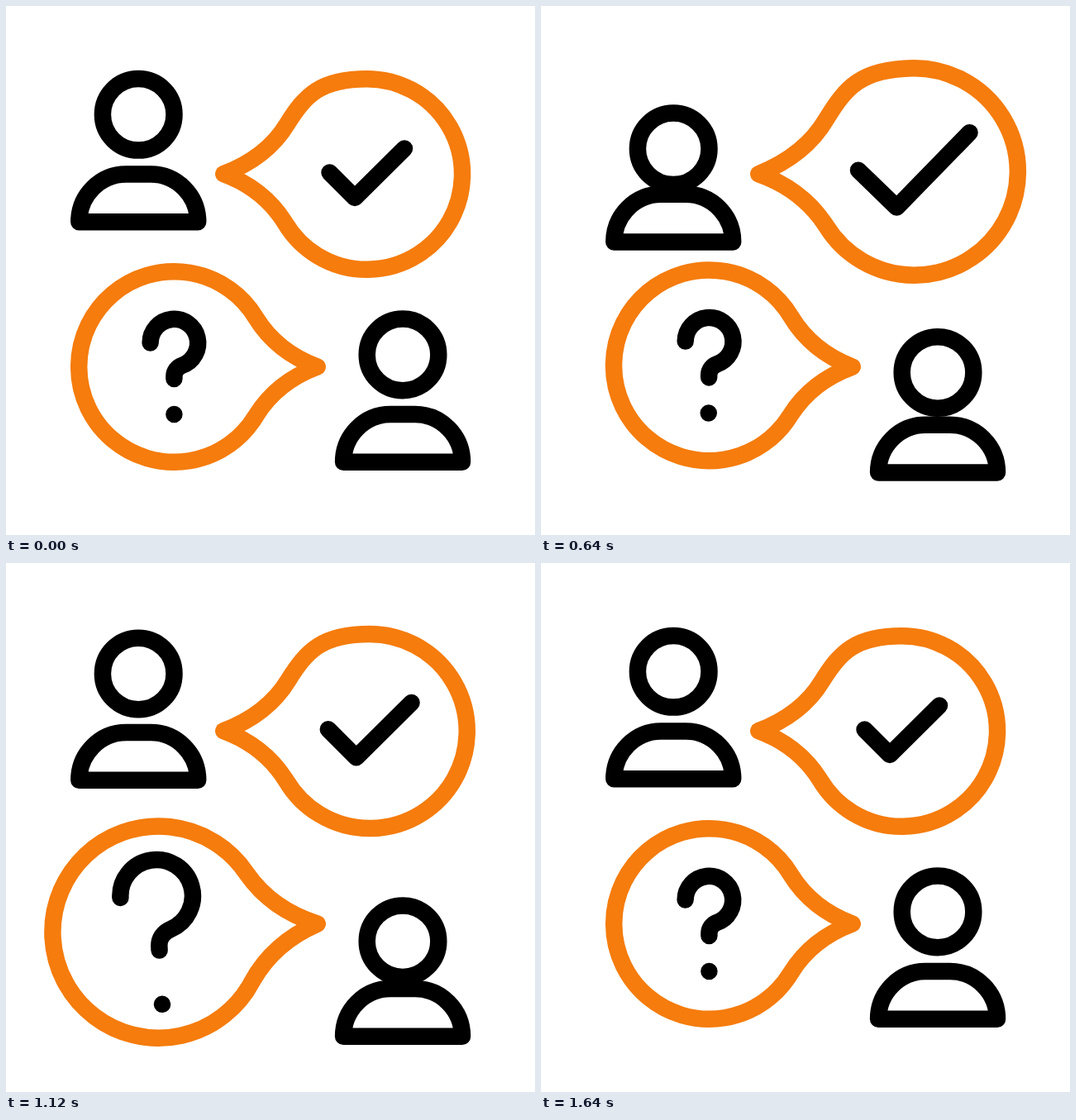
Recreate the animation shown at these times as an HTML page. Size 640x640 px, loop 1720 ms.

```html
<!DOCTYPE html>
<html lang="en">
<head>
<meta charset="utf-8">
<title>Question and answer</title>
<style>
@property --bow { syntax: "<number>"; inherits: true; initial-value: 0; }
@property --swell { syntax: "<number>"; inherits: true; initial-value: 0; }
@property --turn { syntax: "<number>"; inherits: true; initial-value: 0; }

html, body {
  margin: 0;
  width: 100%;
  height: 100%;
  overflow: hidden;
  background: #fff;
}
svg {
  display: block;
  width: 100vw;
  height: 100vh;
  fill: none;
  stroke: #000;
  stroke-width: 20.5px;
  stroke-linecap: round;
  stroke-linejoin: round;
}

.person, .bubble {
  animation: 1720ms cubic-bezier(.37, 0, .63, 1) infinite;
}
.person { animation-name: bow; }
.bubble { animation-name: swell, turn; }
.late { animation-delay: 330ms; }

.head { transform: translateY(calc(41.5px * var(--bow))); }
.body { transform: translateY(calc(24.3px * var(--bow))); }

/* Shapes grow while their line weight stays constant */
.bubble {
  --size: calc(1 + var(--grow) * var(--swell));
  --mark: calc(1 + .52 * var(--swell));
  transform: rotate(calc(var(--side) * var(--turn) * 1deg)) scale(var(--size));
}
.outline {
  stroke: #f57c0d;
  stroke-width: calc(20.5px / var(--size));
}
.mark {
  transform: scale(calc(var(--mark) / var(--size)));
  stroke-width: calc(20.5px / var(--mark));
}
.answer { --grow: .0905; --side: 1; transform-origin: 263.3px 203.2px; }
.answer .mark { transform-origin: 436.7px 203px; }
.question { --grow: .111; --side: -1; transform-origin: 376.7px 436.5px; }
.question .mark { transform-origin: 203.4px 436.5px; }

@keyframes bow {
  0%, 3.78% { --bow: 0; }
  31.7%, 38.1% { --bow: 1; }
  70.5%, 100% { --bow: 0; }
}
@keyframes swell {
  0%, 16.9% { --swell: 0; }
  40.7%, 47.8% { --swell: 1; }
  73%, 100% { --swell: 0; }
}
@keyframes turn {
  0%, 15.7% { --turn: 0; }
  26.7%, 29.1% { --turn: -5; }
  45.3%, 47.7% { --turn: 3; }
  64.5%, 100% { --turn: 0; }
}
</style>
</head>
<body>
<svg viewBox="0 0 640 640">
  <g class="bubble answer">
    <path class="outline" d="M263.3 203.2C290 193 320 176 340 143C362 108 380 88.2 436.7 88.2A115.3 115.3 0 1 1 337.8 262.7C318 231 290 213 263.3 203.2Z"/>
    <path class="mark" d="M391.5 201.5L422 232L482 172.5"/>
  </g>
  <g class="bubble question late">
    <path class="outline" d="M376.7 436.5C350 426.5 322 409 302.4 377.3A115.3 115.3 0 1 0 302.4 495.7C322 464 350 446.5 376.7 436.5Z"/>
    <path class="mark" d="M174.6 407.6A28.8 28.8 0 1 1 213 434.8C207 437 203.4 442 203.4 448V451M203.4 494h.01"/>
  </g>
  <g class="person">
    <circle class="head" cx="160.2" cy="131.3" r="43.3"/>
    <path class="body" d="M88.3 261.2A57 57.7 0 0 1 145.3 203.5H175.2A57 57.7 0 0 1 232.2 261.2Z"/>
  </g>
  <g transform="translate(319.8 290.6)">
    <g class="person late">
      <circle class="head" cx="160.2" cy="131.3" r="43.3"/>
      <path class="body" d="M88.3 261.2A57 57.7 0 0 1 145.3 203.5H175.2A57 57.7 0 0 1 232.2 261.2Z"/>
    </g>
  </g>
</svg>
</body>
</html>
```
